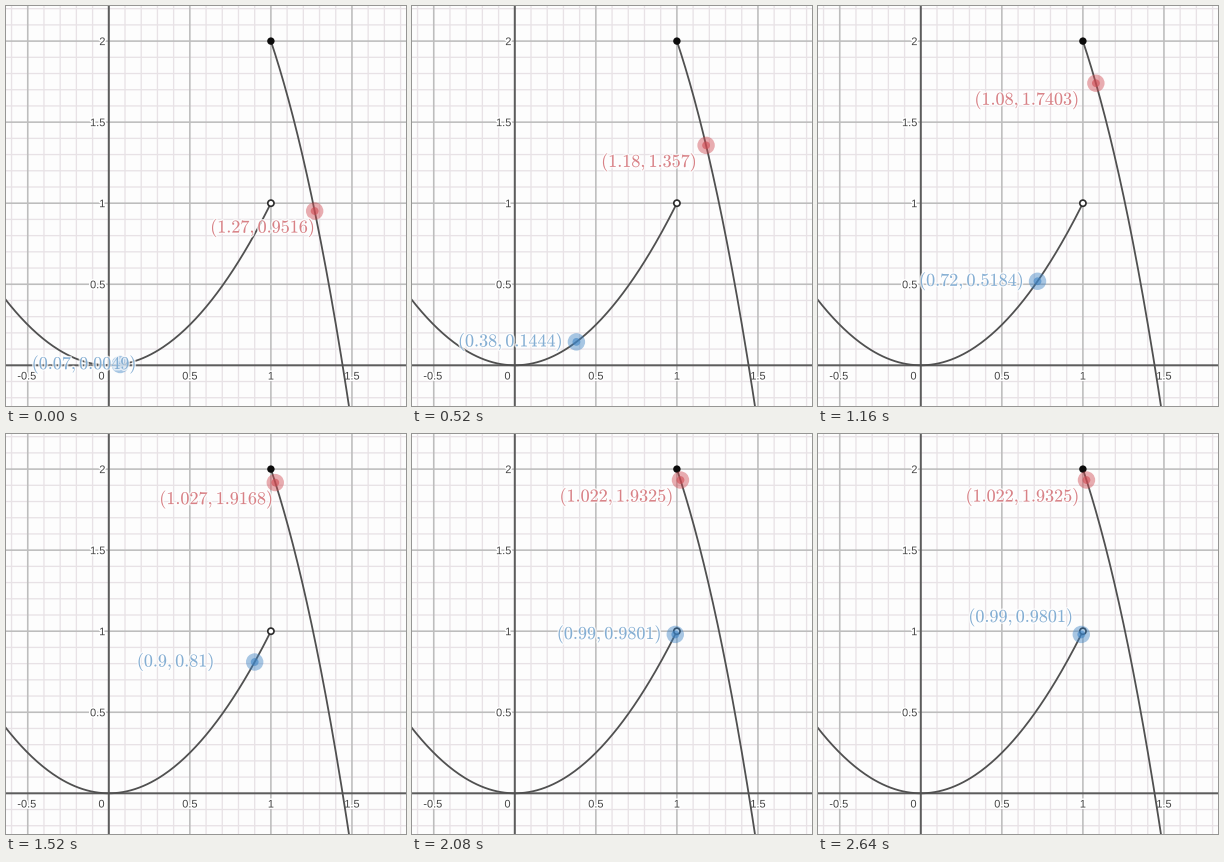
Animation of 400 by 400 pixels, one loop 3.72 s. Source, as a matplotlib script:

```python
import numpy as np
import matplotlib.pyplot as plt
from matplotlib.animation import FuncAnimation
from matplotlib.patches import Circle
from matplotlib.patheffects import withStroke

SIZE, DPI = 400, 100
FRAME_MS, LOOP_MS = 40, 3720
PX = 72 / DPI                      # points per pixel
UNIT, ORIGIN_X, ORIGIN_Y = 162.1, 102.8, 359.3
INK, AXIS, MAJOR, MINOR = "#505050", "#5c5c5c", "#bdbdbd", "#e8e2e6"
RED, BLUE = "#cf4a52", "#3f84c4"

REFRESH = np.r_[0, 40:1401:80, 1440:1521:80, 1640:1721:80, 1920:2641:40]

# Key moments, the x of each point and how far its label is centred from it.
KEY_MS = [0, 40, 520, 920, 1160, 1520, 1720, 2080]
LEFT_X = [.07, .16, .38, .586, .72, .9, .968, .99]
LEFT_DX = [-36, -66, -66, -62, -66, -79, -60, -66]
RIGHT_X = [1.27, 1.263, 1.18, 1.119, 1.08, 1.027, 1.012, 1.022]
RIGHT_DX = [-52, -52, -57, -57, -69, -59, -61, -64]

plt.rcParams["mathtext.fontset"] = "cm"


def sx(x):
    return ORIGIN_X + UNIT * x


def sy(y):
    return ORIGIN_Y - UNIT * y


def parabola(x):
    return x ** 2


def cubic(x):
    return 3 - x ** 3


def number(value, digits):
    return f"{value:.{digits}f}".rstrip("0").rstrip(".")


fig = plt.figure(figsize=(SIZE / DPI, SIZE / DPI), dpi=DPI, facecolor="#fdfdfd")
ax = fig.add_axes([0, 0, 1, 1])
ax.set(xlim=(0, SIZE), ylim=(SIZE, 0))
ax.axis("off")


def draw_grid():
    for k in range(-6, 23):
        if k == 0:
            style = dict(color=AXIS, lw=2 * PX, zorder=2)
        elif k % 5 == 0:
            style = dict(color=MAJOR, lw=1.6 * PX, zorder=1)
        else:
            style = dict(color=MINOR, lw=1.3 * PX, zorder=0)
        ax.axvline(sx(k / 10), snap=False, **style)
        ax.axhline(sy(k / 10), snap=False, **style)


def draw_ticks():
    style = dict(family="Liberation Sans", fontsize=11 * PX, color="#444444",
                 va="center_baseline", zorder=3,
                 path_effects=[withStroke(linewidth=3 * PX, foreground="white")])
    for v in (-.5, .5, 1, 1.5):
        ax.text(sx(v) - (v < 0), 369.5, f"{v:g}", ha="center", **style)
    ax.text(95.5, 369.5, "0", ha="center", **style)
    for v in (.5, 1, 1.5, 2):
        ax.text(99.3, sy(v), f"{v:g}", ha="right", **style)


def draw_curves():
    for f, lo, hi in ((parabola, -.65, 1), (cubic, 1, 1.52)):
        x = np.linspace(lo, hi, 200)
        ax.plot(sx(x), sy(f(x)), color=INK, lw=1.8 * PX, zorder=4)
    ax.add_patch(Circle((sx(1), sy(1)), 3.1, fc="white", ec="#2c2c2c",
                        lw=1.7 * PX, zorder=5))
    ax.add_patch(Circle((sx(1), sy(2)), 3.7, fc="#0c0c0c", lw=0, zorder=5))


class Tracer:
    """A glowing point on a curve with its coordinate label."""

    def __init__(self, f, color, text_color, xs, dxs, dy, lift):
        self.f, self.xs, self.dxs = f, xs, dxs
        self.dy, self.lift = dy, np.array(lift)
        self.discs = [Circle((0, 0), r, fc=color, lw=0, alpha=a, zorder=6)
                      for r, a in ((8.7, .45), (3.9, .6))]
        for disc in self.discs:
            ax.add_patch(disc)
        glow = withStroke(linewidth=3 * PX, foreground="white", alpha=.7)
        self.label = ax.text(0, 0, "", color=text_color, fontsize=18.1 * PX,
                             ha="center", va="center", zorder=7,
                             path_effects=[glow])

    def update(self, t):
        x = round(float(np.interp(t, KEY_MS, self.xs)), 3)
        y = self.f(x)
        px, py = sx(x), sy(y)
        for disc in self.discs:
            disc.center = px, py
        settle = np.clip((t - 2440) / 200, 0, 1)
        offset = np.array([np.interp(t, KEY_MS, self.dxs), self.dy])
        self.label.set_position((px, py) + offset + settle * self.lift)
        self.label.set_text(f"$({number(x, 3)},{number(y, 4)})$")


draw_grid()
draw_ticks()
draw_curves()
tracers = [
    Tracer(parabola, BLUE, "#84aed3", LEFT_X, LEFT_DX, 0, (5.5, -17)),
    Tracer(cubic, RED, "#d88186", RIGHT_X, RIGHT_DX, 17, (0, 0)),
]


def update(i):
    t = REFRESH[REFRESH <= i * FRAME_MS][-1]
    for tracer in tracers:
        tracer.update(t)
    return []


anim = FuncAnimation(fig, update, frames=LOOP_MS // FRAME_MS,
                     interval=FRAME_MS, repeat=True, repeat_delay=0)
plt.show()
```
